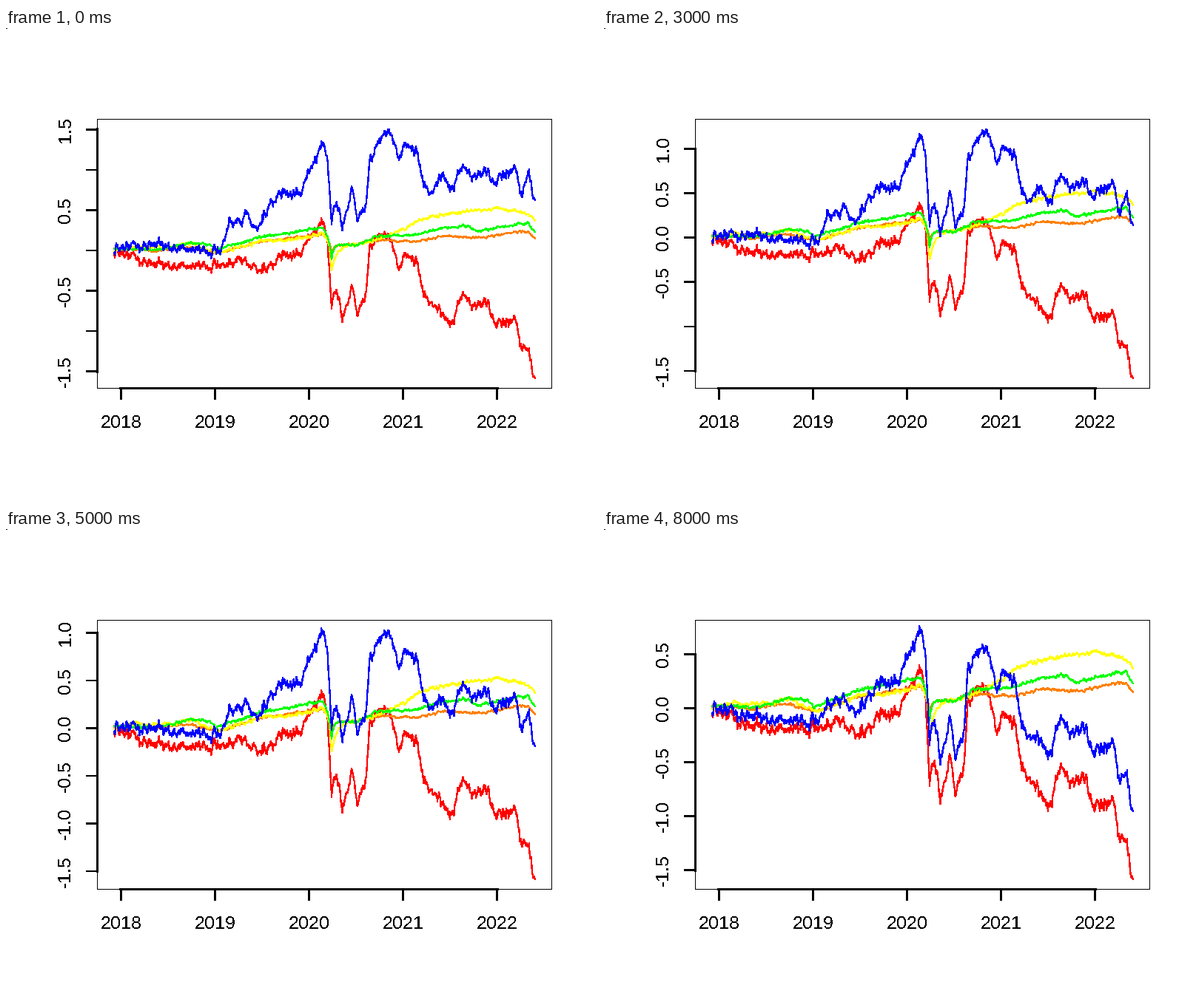
A matplotlib script that plays this animation: 800 by 640 pixels, repeating every 9000 ms.

```python
import numpy as np
import matplotlib.pyplot as plt
from matplotlib.animation import FuncAnimation

W, H, DPI = 800, 640, 100
PX = 72 / DPI                       # one pixel in points
LEFT, RIGHT, TOP, BOTTOM = 123.5, 737.5, 123.5, 487.5
FONT = 25                           # px
FRAMES = 9

plt.rcParams.update({"path.simplify": False, "font.family": "Liberation Sans",
                     "text.hinting": "native", "text.hinting_factor": 1})

rng = np.random.default_rng(5)
x = np.linspace(146, 715, 1127)     # one step per trading day


def trend(*points):
    """Straight segments through (x pixel, hundredths)."""
    px, value = zip(*points)
    return np.interp(x, px, value) / 100


def noise(step, memory=.7):
    """Mean-reverting daily noise that fades out at the right end."""
    kernel = memory ** np.arange(20)
    walk = np.convolve(rng.normal(0, step, x.size), kernel)[:x.size]
    return walk * np.minimum(1, (x[-1] - x) / 5)


def slump(depth, recovery):
    """Sudden fall in spring 2020 with an exponential recovery."""
    d = x - 440
    return -depth * np.exp(-np.abs(d) / np.where(d < 0, 2.5, recovery))


red = trend((146, 0), (180, -13), (210, -20), (296, -20), (321, -9), (341, -28),
            (376, -6), (401, -2), (412, 16), (428, 35.5), (435, 12), (440, -76),
            (442, -52), (449, -55), (454, -90), (467, -47), (475, -80),
            (486, -50), (492, 5), (504, 20), (516, 21), (531, -27), (538, -2),
            (556, -14), (563, -52), (585, -78), (604, -90), (617, -50),
            (628, -68), (651, -66), (660, -90), (688, -85), (695, -115),
            (708, -130), (712, -157), (715, -158.5))
lead = trend((146, 3), (200, 25), (290, 17), (302, 52), (318, 45), (326, 65),
             (335, 46), (358, 78), (400, 75), (428, 97), (468, 122), (492, 106),
             (516, 129.5), (530, 137), (575, 136), (590, 174), (617, 158),
             (652, 163), (668, 182), (698, 190), (706, 222), (715, 221))
yellow = trend((146, 0), (165, 5), (225, 4), (250, 9), (285, -3), (345, 12),
               (380, 12), (430, 22), (444, 5), (474, 7), (516, 18), (575, 43),
               (612, 47), (665, 52), (705, 46), (715, 37))
green = trend((146, 2), (205, 1), (250, 9), (278, 7), (284, 1), (345, 17),
              (428, 28), (443, 8), (474, 6), (498, 17), (555, 20), (592, 28),
              (620, 30), (640, 25), (705, 34), (715, 23))
orange = trend((146, 2), (200, 0), (250, 4), (284, -3), (345, 11), (428, 20),
               (443, 7), (474, 7), (492, 13), (555, 11), (590, 18), (640, 16),
               (675, 21), (705, 24), (715, 15))

yellow += slump(.33, 6) + noise(.008)
green += slump(.25, 2.5) + noise(.006)
orange += slump(.13, 3) + noise(.005)
swing = noise(.025)                 # shared by red and blue
keep = .335 - .05 * np.tanh((x - 450) / 15)   # part of the lead left at the end

fig = plt.figure(figsize=(W / DPI, H / DPI), dpi=DPI, facecolor="white")
ax = fig.add_axes([0, 0, 1, 1])
ax.set(xlim=(0, W), ylim=(H, 0))
ax.axis("off")


def line(xs, ys, color="black", width=1.0, z=2):
    return ax.plot(xs, ys, color=color, lw=width * PX, zorder=z, snap=False,
                   antialiased=False, solid_capstyle="projecting")[0]


def label(px, py, text, angle=0):
    return ax.text(px, py, text, fontsize=FONT * PX, rotation=angle, ha="center",
                   va="baseline", rotation_mode="anchor", antialiased=False)


COLORS = ["#ff0000", "#ff7f00", "#ffff00", "#00ff00", "#0000ff"]
curves = [line(x, x, c, 1.3, 3 + i) for i, c in enumerate(COLORS)]

line([LEFT, RIGHT, RIGHT, LEFT, LEFT], [TOP, TOP, BOTTOM, BOTTOM, TOP])
line([0, 1], [.5, .5])

# Time axis
first, year = 155.3, 127.1
line([first, first + 4 * year], [BOTTOM, BOTTOM], width=3)
for i in range(5):
    px = first + i * year
    line([px, px], [BOTTOM, BOTTOM + 14.5], width=1.56)
    label(px, 541, str(2018 + i))

# Value axis
spine = line([LEFT, LEFT], [TOP, BOTTOM], width=3)
ticks = [(v, line([LEFT - 14.5, LEFT], [0, 0], width=1.56),
          label(87, 0, f"{v:.1f}", 90)) for v in np.arange(-1.5, 1.6, .5)]


def draw(i):
    u = i / (FRAMES - 1)
    shift = .81 * u + .19 * u ** 7
    blue = red + lead * (1 + shift * (keep - 1))

    low, high = red.min(), blue.max()
    scale = (BOTTOM - TOP) / 1.08 / (high - low)
    base = BOTTOM - (BOTTOM - TOP) * .04 / 1.08

    def to_y(v):
        return base - (v - low) * scale

    data = red + swing, orange, yellow, green, blue + swing
    for artist, values in zip(curves, data):
        artist.set_ydata(to_y(values))

    # A label is skipped when it comes too close to the one below
    edge = H
    for v, tick, text in ticks:
        y = to_y(v)
        inside = y >= TOP
        half = FONT * (1.39 + (.333 if v < 0 else 0)) / 2
        fits = inside and y + half + .833 * FONT <= edge
        tick.set_ydata([y, y])
        tick.set_visible(inside)
        text.set_y(y)
        text.set_visible(fits)
        if inside:
            last = y
        if fits:
            edge = y - half
    spine.set_ydata([to_y(-1.5), last])
    return curves


anim = FuncAnimation(fig, draw, frames=FRAMES, interval=1000, repeat=True,
                     cache_frame_data=False)
plt.show()
```
